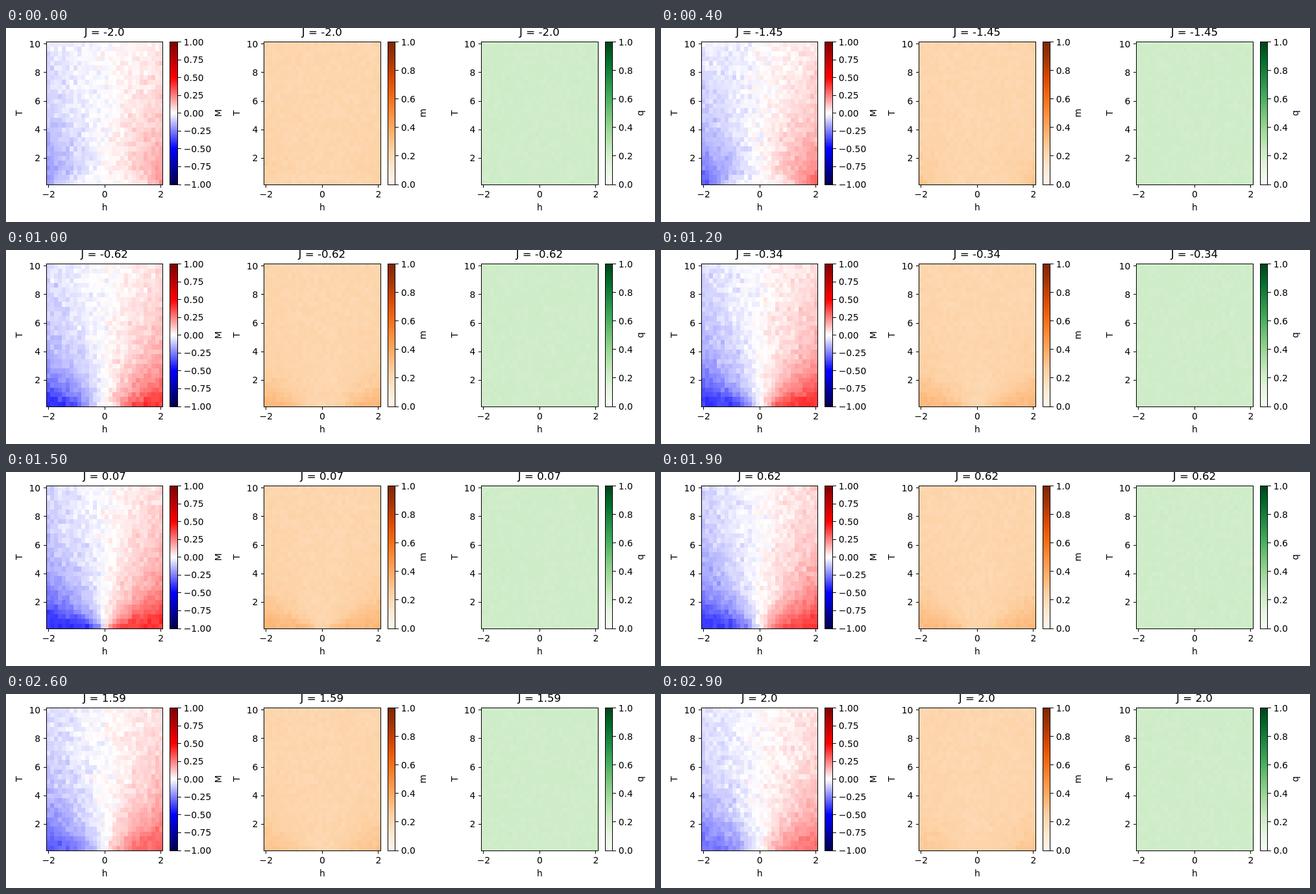
These frames come from a looping animation (1000x300 px, 3 s). An HTML page with a canvas:

```html
<!DOCTYPE html>
<html lang="en">
<head>
<meta charset="utf-8">
<title>Phase diagrams</title>
<style>
  html, body { margin: 0; width: 100%; height: 100%; overflow: hidden; background: #fff; }
  canvas, svg { position: absolute; left: 0; top: 0; width: 1000px; height: 300px; }
  text { font: 13.89px "DejaVu Sans", sans-serif; fill: #000; }
  .title { font-size: 16.67px; }
  .line { fill: none; stroke: #000; stroke-width: 1; shape-rendering: crispEdges; }
</style>
</head>
<body>
<canvas id="cells" width="1000" height="300"></canvas>
<svg id="axes" viewBox="0 0 1000 300"></svg>
<script>
const STEPS = 30, STEP_MS = 100, N = 30;
const TOP = 21.5, BOTTOM = 242, WIDTH = 179.3;
const ORANGES = '#fff5eb #fee6ce #fdd0a2 #fdae6b #fd8d3c #f16913 #d94801 #a63603 #7f2704';
const GREENS = '#f7fcf5 #e5f5e0 #c7e9c0 #a1d99b #74c476 #41ab5d #238b45 #006d2c #00441b';
const SEISMIC = '#00004c #0000ff #ffffff #ff0000 #800000';

const panels = [
  { x: 62.5, bar: 252.5, barW: 12, label: 'M', labelX: 331.6, colors: SEISMIC, min: -1, tick: 0.25, digits: 2 },
  { x: 397.7, bar: 588.5, barW: 11, label: 'm', labelX: 646.5, colors: ORANGES, min: 0, tick: 0.2, digits: 1 },
  { x: 732.8, bar: 923.5, barW: 11, label: 'q', labelX: 981.5, colors: GREENS, min: 0, tick: 0.2, digits: 1 }
];

const ctx = document.getElementById('cells').getContext('2d');
const svg = document.getElementById('axes');

function add(name, attrs, content = '') {
  const el = document.createElementNS('http://www.w3.org/2000/svg', name);
  for (const key in attrs) el.setAttribute(key, attrs[key]);
  el.textContent = content;
  svg.append(el);
  return el;
}

const write = (x, y, content, anchor = 'middle') =>
  add('text', { x, y, 'text-anchor': anchor }, content);
const writeUp = (x, y, content) =>
  add('text', { transform: `translate(${x} ${y}) rotate(-90)`, 'text-anchor': 'middle' }, content);
const line = d => add('path', { d, class: 'line' });
const snap = v => Math.floor(v) + 0.5;
const signed = (v, digits) => v.toFixed(digits).replace('-', '\u2212');

// Colour lookup of 256 entries between evenly spaced stops
function makeMap(list) {
  const stops = list.split(' ').map(c => [1, 3, 5].map(i => parseInt(c.slice(i, i + 2), 16)));
  return Array.from({ length: 256 }, (_, k) => {
    const pos = k / 255 * (stops.length - 1);
    const i = Math.min(stops.length - 2, Math.floor(pos));
    const rgb = stops[i].map((v, c) => Math.round(v + (stops[i + 1][c] - v) * (pos - i)));
    return `rgb(${rgb})`;
  });
}

function colorOf(p, value) {
  const k = Math.floor((value - p.min) / (1 - p.min) * 256);
  return p.map[Math.max(0, Math.min(255, k))];
}

function buildPanel(p) {
  p.map = makeMap(p.colors);
  const mid = p.x + WIDTH / 2;
  line(`M${snap(p.x)} ${TOP}H${snap(p.x + WIDTH)}V${snap(BOTTOM)}H${snap(p.x)}Z`);
  p.title = write(mid - 0.5, 12, '');
  p.title.setAttribute('class', 'title');

  for (const h of [-2, 0, 2]) {
    const x = mid + h * 43.25;
    line(`M${snap(x)} 242v5`);
    write(x, 262, signed(h, 0));
  }
  for (let t = 2; t <= 10; t += 2) {
    const y = 245.5 - t * 22.07;
    line(`M${snap(p.x)} ${snap(y)}h-5`);
    write(p.x - 9.4, y + 5, t, 'end');
  }
  write(mid, 282, 'h');
  writeUp(p.x - 37.3, 131.5, 'T');

  const right = p.bar + p.barW;
  p.map.forEach((color, k) => {
    const y = Math.round(BOTTOM - (k + 1) * (BOTTOM - TOP) / 256);
    const end = Math.round(BOTTOM - k * (BOTTOM - TOP) / 256);
    ctx.fillStyle = color;
    ctx.fillRect(p.bar, y, p.barW, end - y);
  });
  line(`M${p.bar} ${TOP}H${right}V${snap(BOTTOM)}H${p.bar}Z`);
  const count = Math.round((1 - p.min) / p.tick);
  for (let i = 0; i <= count; i++) {
    const y = BOTTOM - i / count * (BOTTOM - TOP);
    line(`M${right} ${snap(y)}h5`);
    write(right + 9.2, y + 5, signed(p.min + i * p.tick, p.digits), 'start');
  }
  writeUp(p.labelX, 131.5, p.label);
}

function randomizer(seed) {
  return () => {
    seed = (seed + 0x6d2b79f5) | 0;
    let t = Math.imul(seed ^ (seed >>> 15), 1 | seed);
    t = (t + Math.imul(t ^ (t >>> 7), 61 | t)) ^ t;
    return ((t ^ (t >>> 14)) >>> 0) / 4294967296;
  };
}

// Mean magnetisation: a thermal step that negative coupling pushes away from h = 0
// and positive coupling softens
function magnet(J, h, T) {
  const anti = Math.max(0, -J), ferro = Math.max(0, J);
  const w = Math.hypot(T * (1 + 0.2 * anti), Math.tanh(ferro) + 0.35 * anti);
  const level = 0.39 - 0.025 * ferro * ferro;
  return level * (Math.tanh((h - anti) / w) + Math.tanh((h + anti) / w)) / 2;
}

function titleOf(J) {
  const s = String(Math.round(J * 100) / 100);
  return 'J = ' + (s.includes('.') ? s : s + '.0');
}

function draw(step) {
  const J = -2 + 4 * step / (STEPS - 1);
  const rand = randomizer(step * 977 + 11);
  const noise = sd => (rand() + rand() + rand() + rand() - 2) * 1.73 * sd;
  const edgeY = r => Math.round(BOTTOM - r * (BOTTOM - TOP) / N);

  for (const p of panels) p.title.textContent = titleOf(J);
  for (let r = 0; r < N; r++) {
    const T = (r + 1) / 3;
    const y = edgeY(r + 1), height = edgeY(r) - y;
    for (let c = 0; c < N; c++) {
      const M = magnet(J, -2 + 4 * c / (N - 1), T);
      const values = [M + noise(0.021), 0.216 + 0.75 * M * M + noise(0.009), 0.216 + noise(0.006)];
      panels.forEach((p, i) => {
        const x = Math.round(p.x + c * WIDTH / N);
        const end = Math.round(p.x + (c + 1) * WIDTH / N);
        ctx.fillStyle = colorOf(p, values[i]);
        ctx.fillRect(x, y, end - x, height);
      });
    }
  }
}

panels.forEach(buildPanel);

let shown = -1;
const start = performance.now();
function tick() {
  const step = Math.floor((performance.now() - start) / STEP_MS) % STEPS;
  if (step !== shown) draw(shown = step);
  requestAnimationFrame(tick);
}
tick();
</script>
</body>
</html>
```
